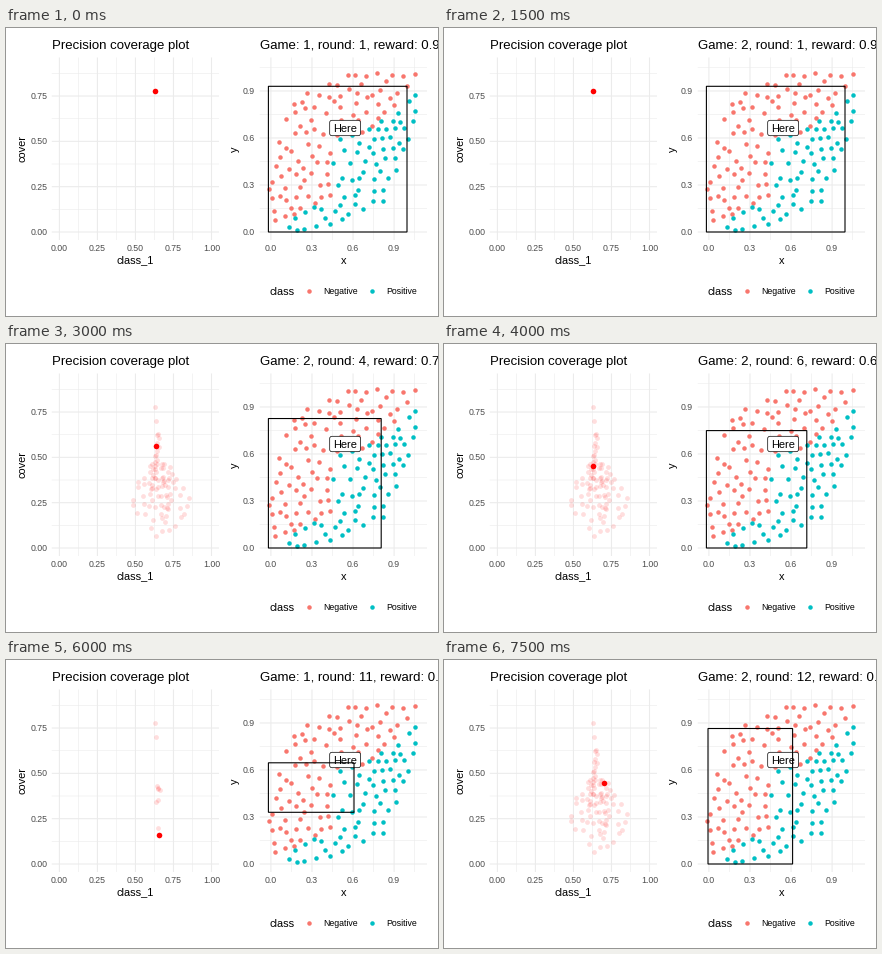
Write a matplotlib script that moves like this. It is 432 px wide and 288 px high and loops after 8 s.

```python
import numpy as np
import matplotlib.pyplot as plt
from matplotlib.animation import FuncAnimation
from matplotlib.patches import FancyBboxPatch, Rectangle
from matplotlib.path import Path

plt.rcParams["font.family"] = "Liberation Sans"

W, H = 432, 288
SALMON, TEAL, GREY, GRID = "#F8766D", "#00BFC4", "#4D4D4D", "#EBEBEB"
rng = np.random.default_rng(11)

fig = plt.figure(figsize=(W / 72, H / 72), dpi=72, facecolor="white")
ax = fig.add_axes([0, 0, 1, 1])
ax.set(xlim=(0, W), ylim=(H, 0))
ax.axis("off")


def label(x, y, s, size, color="black", **kw):
    return ax.text(x, y, s, fontsize=size, color=color, va="baseline",
                   rotation_mode="anchor", **kw)


def dots(xy, color, d, **kw):
    x, y = np.transpose(xy)
    return ax.scatter(x, y, s=d * d, c=color, linewidths=0, **kw)


def spread(outline, n, tries):
    """Fill an outline with n evenly spaced random points."""
    shape = Path(outline)
    low, high = np.min(outline, axis=0), np.max(outline, axis=0)
    pool = rng.uniform(low, high, (n * tries * 4, 2))
    pool = pool[shape.contains_points(pool)]
    pts = [pool[0]]
    for _ in range(n - 1):
        pick = pool[rng.integers(len(pool), size=tries)]
        gap = np.linalg.norm(pick[:, None] - np.array(pts), axis=2).min(axis=1)
        pts.append(pick[gap.argmax()])
    return np.array(pts)


def panel(left, right, x0, xs, ys, xt, yt, half, fmt, xlab, ylab, ylab_x):
    top, bottom, y0 = 29.5, 212, 204
    for shift, lw in ((half, 0.55), (0, 1.07)):
        style = dict(color=GRID, lw=lw, snap=False, zorder=1,
                     solid_capstyle="butt")
        for v in x0 + (xt + shift) * xs:
            if v < right:
                ax.plot([v, v], [top, bottom], **style)
        for v in y0 - (yt + shift) * ys:
            ax.plot([left, right], [v, v], **style)
    for v in xt:
        label(x0 + v * xs, 223, fmt % v, 8.8, GREY, ha="center")
    for v in yt:
        label(left - 4.6, y0 - v * ys + 3, fmt % v, 8.8, GREY, ha="right")
    label((left + right) / 2, 235.5, xlab, 11, ha="center")
    label(ylab_x, 121, ylab, 11, ha="center", rotation=90)


quarters, thirds = np.arange(5) / 4, np.arange(4) * 0.3
panel(45.8, 213, 53.4, 152.1, 181.3, quarters, quarters[:4], 0.125, "%.2f",
      "class_1", "cover", 19.7)
panel(253.8, 421, 264.9, 136.9, 156.7, thirds, thirds, 0.15, "%.1f",
      "x", "y", 232)
label(45.8, 21, "Precision coverage plot", 13.2)
title = label(253.8, 21, "", 13.2)

# The two classes fill neighbouring regions
negative = [(260, 155), (273, 97), (292, 67), (338, 46), (405, 42), (414, 37),
            (408, 57), (383, 86), (358, 104), (333, 109), (325, 150),
            (331, 172), (303, 178), (268, 203)]
positive = [(278, 201), (300, 179), (342, 176), (328, 151), (326, 130),
            (333, 111), (367, 98), (395, 80), (410, 60), (412, 73), (408, 97),
            (382, 160), (380, 171), (351, 190), (285, 205)]
dots(spread(negative, 92, 12), SALMON, 4.5, zorder=2)
dots(spread(positive, 66, 12), TEAL, 4.5, zorder=2)

ax.add_patch(FancyBboxPatch((323.7, 92.3), 30.8, 15.4, fc="white", ec="black",
                            boxstyle="round,pad=0,rounding_size=2.2",
                            lw=0.7, zorder=3))
label(339, 104, "Here", 11, ha="center", zorder=4)

label(263.8, 267, "class", 11)
for x, color, name in ((303.2, SALMON, "Negative"), (366, TEAL, "Positive")):
    dots([(x, 263.3)], color, 4.5)
    label(x + 13.8, 266.3, name, 8.8)

# Key rounds of each game: round, result x, y, box left, top, right, bottom
keys = {
    1: np.array([(1, 149.4, 62.5, 262.4, 58.3, 401, 204),
                 (10, 151.5, 168, 262.4, 102.8, 348, 166),
                 (11, 152.7, 175.3, 262.4, 102.8, 348, 152.3),
                 (100, 160.7, 144.5, 285, 58.3, 357.6, 176.2)]),
    2: np.array([(1, 149.4, 62.5, 262.4, 58.3, 401, 204),
                 (3, 150.8, 91.3, 262.4, 68.5, 381.4, 204),
                 (6, 148.6, 122, 262.4, 86.6, 362.8, 204),
                 (9, 144, 150, 262.4, 111, 344.5, 204),
                 (10, 159, 112, 264, 58.3, 357, 204),
                 (12, 160.4, 123.3, 264, 68.5, 348.6, 204)]),
}


def state(game, rnd):
    k = keys[game]
    return np.array([np.interp(rnd, k[:, 0], col) for col in k[:, 1:].T])


# Past results: the start of each game, and the complete cloud
peel = np.array([state(2, r)[:2] for r in range(1, 10)])
dive = np.vstack([peel[:2], rng.normal((152, 137), (2.2, 5.5), (6, 2)),
                  state(1, 10)[:2]])
rim = [(146, 116), (160, 116), (169, 130), (184, 150), (181, 172), (153, 197),
       (146, 190), (128, 169), (125, 150), (134, 130)]
core = [(146, 118), (162, 118), (172, 150), (160, 172), (142, 160)]
column = np.column_stack([rng.normal(151.5, 1.2, 8), np.linspace(90, 120, 8)])
cloud = np.vstack([spread(rim, 52, 4), spread(core, 24, 2), column, peel])

past = dots([(0, 0)], "red", 4.8, alpha=0.13, zorder=2)
now = dots([(0, 0)], "red", 5.6, zorder=3)
box = ax.add_patch(Rectangle((0, 0), 1, 1, fill=False, ec="black", lw=1.1,
                             snap=False, joinstyle="miter", zorder=5))

steps = ([(1, 1), (1, 10), (1, 100)] + [(2, r) for r in range(1, 10)]
         + [(1, 11)] + [(2, r) for r in range(10, 13)])


def update(i):
    game, rnd = steps[i]
    x, y, left, top, right, bottom = state(game, rnd)
    reward = max(9 - rnd // 2, 1) / 10
    title.set_text(f"Game: {game}, round: {rnd}, reward: {reward}")
    box.set_bounds(left, top, right - left, bottom - top)
    now.set_offsets([(x, y)])
    if rnd == 100 or game == 2 and rnd > 3:
        past.set_offsets(cloud)
    else:
        past.set_offsets((dive if game == 1 else peel)[:rnd])
    return title, box, now, past


anim = FuncAnimation(fig, update, frames=len(steps), interval=500,
                     repeat=True, repeat_delay=0)
plt.show()
```
